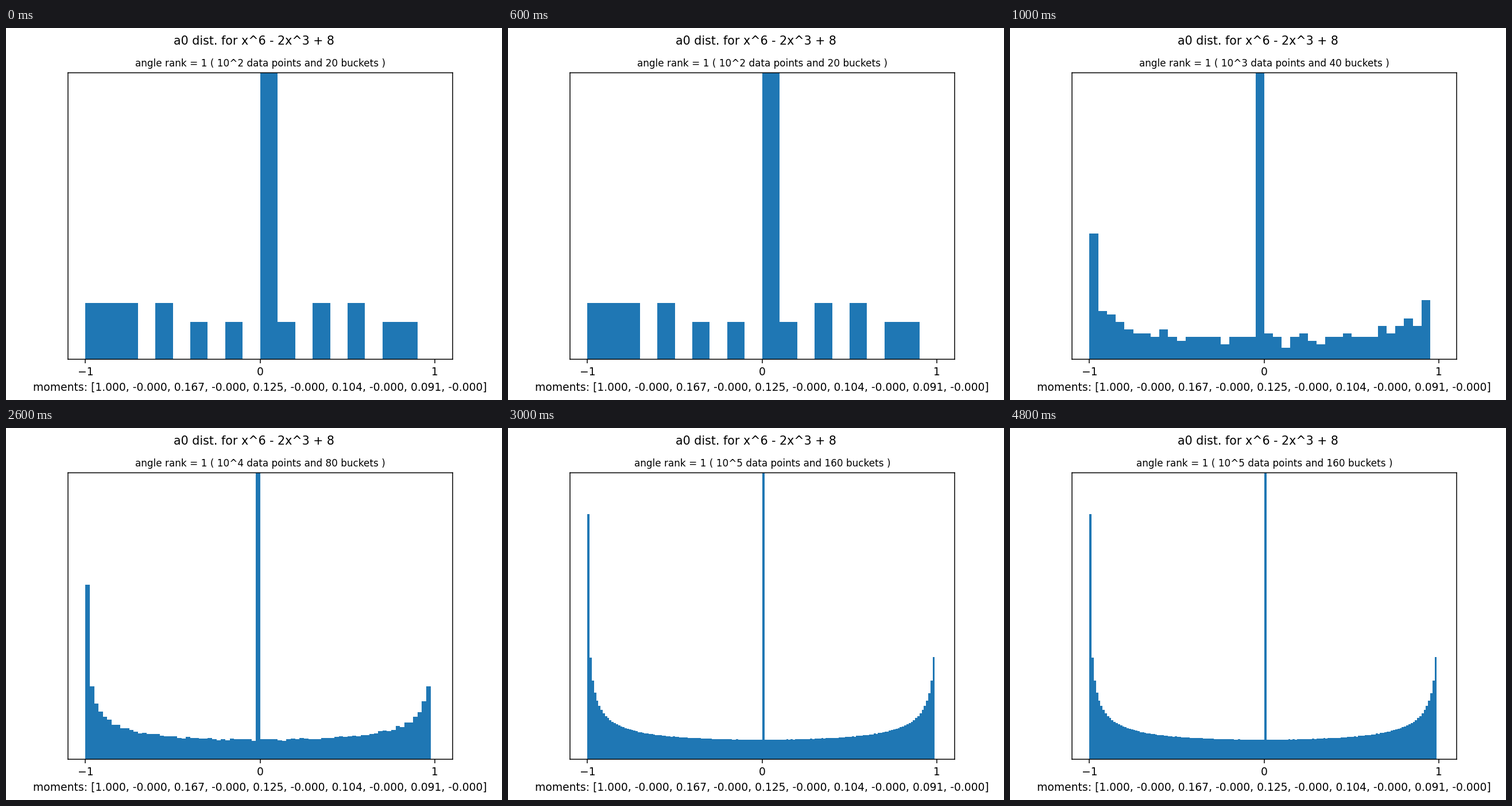
Write a matplotlib script that moves like this. It is 864x648 px and loops after 6 s.

```python
import numpy as np
import matplotlib.pyplot as plt
from matplotlib.animation import FuncAnimation

plt.rcParams["font.family"] = "DejaVu Sans"

ANGLE = np.arccos(1 / np.sqrt(8))  # argument of the roots 1 ± i√7 of y² - 2y + 8
MOMENTS = ("moments: [1.000, -0.000, 0.167, -0.000, 0.125, "
           "-0.000, 0.104, -0.000, 0.091, -0.000]")
LEVELS = 4
HOLD = 3  # the finest histogram stays this many steps


def traces(count):
    """Normalised traces for r = 1..count; only multiples of 3 are non-zero."""
    values = np.zeros(count)
    values[2::3] = np.cos(ANGLE * np.arange(1, count // 3 + 1))
    return values


def histogram(level):
    buckets = 20 * 2 ** level
    # The end point is left out, so the last bucket stays empty.
    edges = np.arange(-1, 1, 2 / buckets)
    heights, _ = np.histogram(traces(10 ** (level + 2)), edges, density=True)
    return buckets, edges, heights


histograms = [histogram(level) for level in range(LEVELS)]

fig, ax = plt.subplots(figsize=(6.4, 4.8), dpi=135)
fig.suptitle("a0 dist. for x^6 - 2x^3 + 8", fontsize=11)


def draw(step):
    level = min(step, LEVELS - 1)
    buckets, edges, heights = histograms[level]
    ax.clear()
    ax.bar(edges[:-1], heights, width=np.diff(edges), align="edge", color="C0")
    ax.set(xlim=(-1.1, 1.1), ylim=(0, 1.6), xticks=[-1, 0, 1], yticks=[])
    ax.set_xticklabels(["\u22121", "0", "1"])
    ax.set_xlabel(MOMENTS)
    ax.set_title(f"angle rank = 1 ( 10^{level + 2} data points "
                 f"and {buckets} buckets )", fontsize=9)
    return ax.patches


anim = FuncAnimation(fig, draw, frames=LEVELS - 1 + HOLD, interval=1000,
                     init_func=lambda: draw(0), repeat=True, repeat_delay=0)
plt.show()
```
